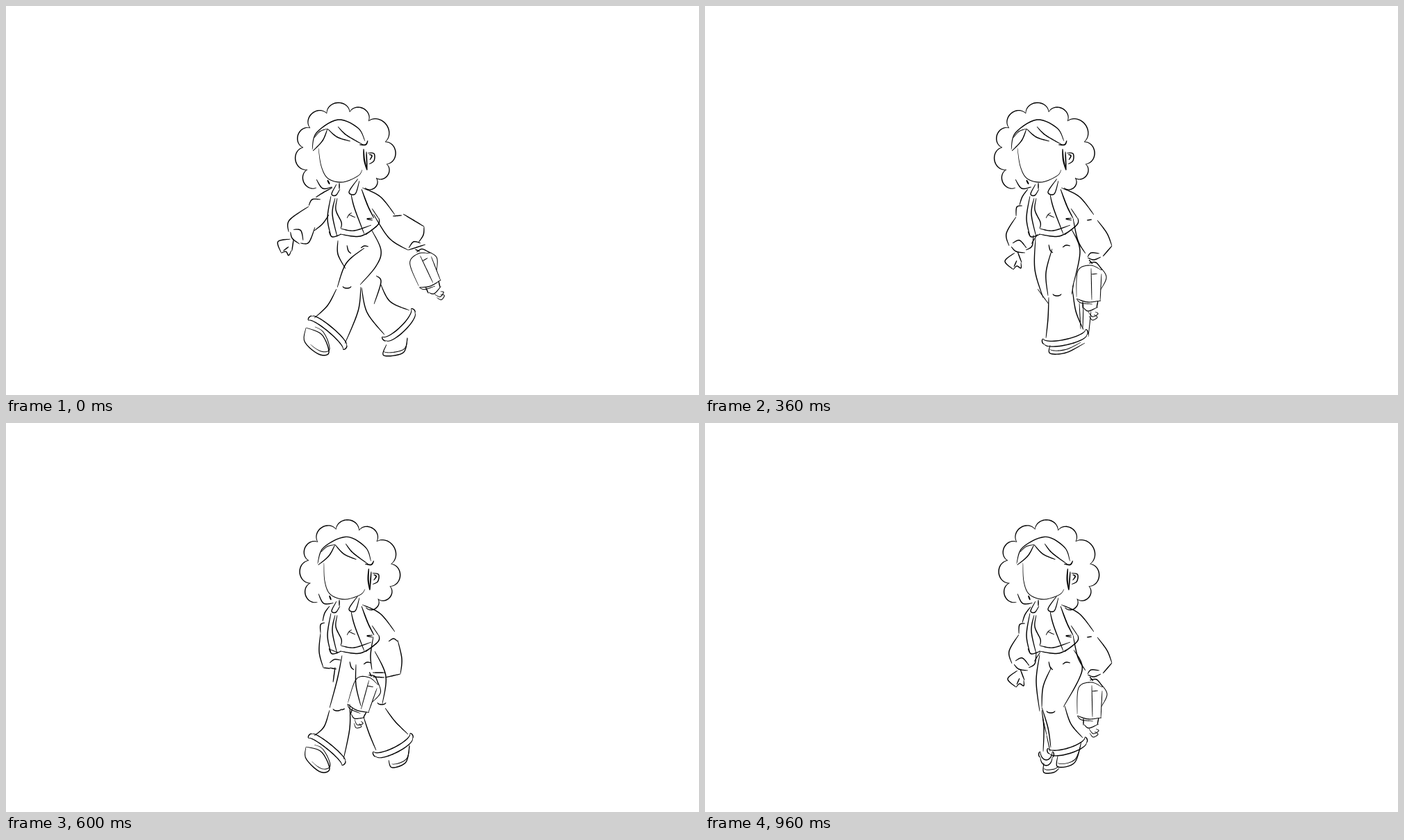
An HTML page with a canvas that plays this animation: 998x561 px, repeating every 1080 ms.

```html
<!DOCTYPE html>
<html lang="en">
<head>
<meta charset="utf-8">
<title>Walk cycle</title>
<style>
html, body { margin: 0; width: 100%; height: 100%; overflow: hidden; background: #fff; }
canvas { display: block; width: 998px; height: 561px; }
</style>
</head>
<body>
<canvas id="stage" width="998" height="561"></canvas>
<script>
const ctx = document.getElementById('stage').getContext('2d');
const STEP = 120, SAMPLES = 28, WEIGHT = 1.4;
const line = (fn, w = WEIGHT) => ({ w, pts: Array.from({ length: SAMPLES + 1 }, (_, i) => fn(i / SAMPLES)) });

// Smooth curve through x y pairs; an odd count means a leading line weight.
function curve(nums) {
  const w = nums.length % 2 ? nums.shift() : WEIGHT;
  const n = nums.length / 2 - 1;
  const at = (i, k) => nums[2 * Math.max(0, Math.min(n, i)) + k];
  return line(s => {
    const i = Math.min(n - 1, Math.floor(s * n)), t = s * n - i;
    return [0, 1].map(k => {
      const a = at(i - 1, k), b = at(i, k), c = at(i + 1, k), d = at(i + 2, k);
      return b + t * ((c - a) + t * ((2 * a - 5 * b + 4 * c - d) + t * (3 * b - a - 3 * c + d))) / 2;
    });
  }, w);
}

// Half-oval between two points, bulging to the left of the way from a to b.
function arc(a, b, bulge, w) {
  const dx = b[0] - a[0], dy = b[1] - a[1];
  return line(t => {
    const u = (1 - Math.cos(Math.PI * t)) / 2, h = bulge * Math.sin(Math.PI * t);
    return [a[0] + dx * u + dy * h, a[1] + dy * u - dx * h];
  }, w);
}

const split = text => text.split('/').map(s => s.trim().split(' ').map(Number));
const ink = text => split(text).map(curve);
const mapPts = (art, f) => art.map(l => ({ w: l.w, pts: l.pts.map(f) }));
const shift = (art, dx, dy) => mapPts(art, ([x, y]) => [x + dx, y + dy]);
const mid = (a, b) => a.map((l, i) => ({
  w: (l.w + b[i].w) / 2,
  pts: l.pts.map((p, j) => p.map((v, k) => (v + b[i].pts[j][k]) / 2))
}));
function turn(art, cx, cy, a) {
  const c = Math.cos(a), s = Math.sin(a);
  return mapPts(art, ([x, y]) => [cx + (x - cx) * c - (y - cy) * s, cy + (x - cx) * s + (y - cy) * c]);
}

// Hair: one curl between each pair of neighbouring joints.
const joints = split('447 262/434 236/428 204/438 176/462 155/495 153/522 166/546 196/548 228/533 248/517 262');
const curls = joints.slice(1).map((p, i) => arc(joints[i], p, 0.44));
const face = ink('441 207 447 183 478 164 507 176 517 195/463 177 456 194 442 209/1 444 190 452 181 463 177/' +
  '463 177 477 189 496 195/478 174 490 186 514 200/1.7 521 194 518 200 509 200/' +
  '1 450 205 454 231 464 249 485 254 507 245 513 236/2 515 206 516 222 520 237/1.6 519 210 520 236/' +
  '521 212 530 213 530 223 523 228/1.6 523 214 527 216 524 222/447 250 456 263 470 261/2 463 251 466 257');
const headA = curls.concat(face), headB = turn(headA, 483, 275, 0.11);

const torso = ink('480 255 480 264/476 257 469 271 475 273 481 264/507 249 494 268 503 271 509 252/' +
  '468 274 463 306 468 332/474 277 470 300 477 333/477 277 475 294 483 312 482 321/' +
  '1 491 306 494 301 498 298/1 494 301 503 305/497 272 502 292 516 329/1.6 512 264 521 288 530 306/' +
  '1 527 292 537 307/528 306 520 307 528 309/482 321 501 324 526 316/481 329 510 332 534 318/' +
  '537 306 536 315 518 330/465 325 470 333 483 329');
const crease = ink('491 345 493 353 497 357/511 349 516 346 522 347');

// Bag with the hand that holds it, measured from its top.
const bag = ink('1 -20 46 -18 8 0 0 16 7/1 16 12 14 52/1 1 4 2 50/1 1 13 10 12/1.2 -20 48 -4 53 15 51/' +
  '1 -20 48 -14 54 3 56/-11 52 -11 62/9 61 11 51/1.2 -10 61 -3 66 11 60/' +
  '1 -3 67 3 74 11 70 7 67/1 -2 73 3 79 10 75 5 71/1 14 2 23 17 15 35/-2 -3 8 -4 17 7/-2 -8 3 -2');
function bagAt(x, y, a, k) {
  return shift(turn(mapPts(bag, p => p.map(v => v * k)), 0, 0, a), x, y);
}

// Sleeves: swung out, hanging, tucked in.
const leftOut = ink('470 262 457 269 446 276/453 279 441 279 436 288/436 289 408 309 407 326/' +
  '465 301 456 314 444 324/424 342 436 341 445 319');
const leftHang = ink('465 264 457 275 453 287/457 288 449 290 448 303/448 304 434 328 438 346/' +
  '1 479 329 470 343/473 330 471 346 462 352');
const leftIn = ink('466 264 459 274 456 286/459 288 453 291 453 303/453 303 451 330 457 353/' +
  '1 465 326 478 331/457 353 467 354');
const fist = ink('443 342 453 338 463 349/441 347 448 354 461 356/446 356 432 368 444 380/' +
  '444 380 449 375 455 378 455 370/445 376 449 367/450 354 456 370');
const fistOut = shift(turn(fist, 451, 352, 0.5), -35, -17);
const cuffIn = ink('466 346 473 341 482 342/466 353 476 355/474 352 471 374');

const shoulder = '513 262 539 275 560 301/';
const rightOut = ink(shoulder + '557 303 570 302/572 300 602 318/602 318 601 330 594 341/' +
  '529 300 552 335 579 352/580 349 587 340 597 342/579 352 604 344');
const rightHang = ink(shoulder + '550 309 557 308/565 309 579 328 586 346/586 346 573 361/' +
  '530 306 537 338 548 357/551 362 556 356 568 357/551 363 560 366 570 362');
const rightIn = ink(shoulder + '551 315 558 311 564 315/564 313 570 340 568 362/568 362 546 367/' +
  '529 308 525 335 527 356/528 360 546 360/528 366 545 367');

// Leg: two thigh lines, two shin lines, a shoe and perhaps a knee tick; the hem follows from the shins.
function leg(text) {
  const rows = split(text), knee = rows[5], art = rows.slice(0, 5).map(curve);
  const a = art[2].pts[SAMPLES], b = art[3].pts[SAMPLES];
  const dx = b[0] - a[0], dy = b[1] - a[1], len = Math.hypot(dx, dy);
  const ux = dx / len, uy = dy / len;
  const from = [a[0] - ux * 4, a[1] - uy * 4], to = [b[0] + ux * 3, b[1] + uy * 3];
  const sag = Math.min(7, 7 - dy / 3) / len;
  const drop = ([x, y], d) => [x - uy * d, y + ux * d];
  art.push(arc(from, to, -sag), arc(drop(from, 8), drop(to, 8), -sag));
  art.push(arc(from, drop(from, 8), -0.3), arc(to, drop(to, 8), 0.3));
  const sole = art[4].pts;
  art.push(line(t => {
    const p = sole[Math.round(SAMPLES * (0.3 + 0.6 * t))];
    return [p[0] + 1, p[1] - 5];
  }, 1));
  if (knee) art.push(arc([knee[0] - 6, knee[1] - 3], [knee[0] + 6, knee[1] - 3], -0.25));
  return art;
}

const near0 = leg('516 349 490 371 477 406/526 322 540 352 533 375 510 402/476 408 463 432 444 450/' +
  '511 405 507 440 488 487/432 464 430 484 450 502 465 500 455 474 432 464/491 407');
const near1 = leg('516 348 490 370 474 408/526 322 538 354 531 376 509 399/474 411 464 438 449 472/' +
  '508 404 504 435 511 474/447 487 443 500 468 503 492 487/490 410');
const near2 = leg('500 350 491 385 494 418/528 322 540 354 529 407/495 420 494 450 491 479/' +
  '529 407 534 440 545 467/497 489 497 501 520 500 547 486/507 418');
const near3 = leg('504 348 504 378 511 408/531 329 547 365 542 405/515 424 523 448 533 472/' +
  '546 411 560 430 579 449/551 486 556 497 576 489 581 464/541 406');
const near4 = leg('505 348 499 378 500 408/531 329 546 372 534 414/508 431 518 450 530 470/' +
  '538 416 555 433 573 441/549 486 564 491 577 470 573 448/538 416');
const near5 = leg('499 352 487 380 485 410/531 327 543 357 516 410/485 410 494 440 498 468/' +
  '518 408 527 434 544 454/508 480 508 496 532 490 542 460/498 418');

const far0 = leg('533 389 540 398 530 430/478 338 478 358 489 379/512 406 520 442 545 474/' +
  '539 400 553 426 581 439/548 488 544 504 572 500 578 478');
const far1 = leg('530 384 532 398 536 411/480 335 475 352 480 376/507 420 522 449 544 475/' +
  '536 410 555 431 581 441/548 486 548 499 571 495 581 470/521 425');
const far2 = ink('476 335 475 380 487 421/1 479 408 495 430/1 539 428 541 466/1 545 430 544 466/' +
  '1 556 440 552 477/1 531 400 528 416');
const far3 = leg('484 335 477 370 466 411/488 412 483 414/466 414 458 438 444 451/' +
  '495 405 495 440 486 485/432 467 432 484 452 503 466 499 454 474 432 467/477 415');
const far4 = leg('484 335 477 380 478 427/488 421 484 426/479 430 478 450 476 475/' +
  '514 440 522 455 526 473/478 489 480 504 500 504 522 489/486 426');
const far5 = leg('482 334 477 372 482 416/1 486 424 492 450/485 414 488 440 487 474/' +
  '1 492 450 497 474/488 490 488 504 502 504 510 498');
const farPass = shift(turn(far1, 505, 340, 0.1), 0, -6);
const farReach = turn(far3, 490, 335, -0.15);

const leftUp = turn(leftOut.concat(fistOut), 463, 270, 0.028);
const leftDown = leftHang.concat(fist);
const rightUp = turn(rightOut, 520, 265, -0.055);
const tucked = [leftIn, cuffIn, rightIn];
const crease2 = shift(crease, 4, -1);

const poses = [
  [headA, crease, leftOut, fistOut, rightOut, near0, far0, bagAt(594, 357, -0.42, 0.94)],
  [headA, crease, leftUp, rightUp, near1, far1, bagAt(600, 352, -0.46, 0.94)],
  [headA, crease, mid(leftUp, leftDown), mid(rightUp, rightHang), mid(near1, near2), farPass, bagAt(577, 364, -0.23, 0.97)],
  [headA, crease2, leftDown, rightHang, near2, far2, bagAt(555, 374, 0, 1)],
  [headA, crease2, mid(leftHang, leftIn), shift(fist, 8, 0), mid(rightHang, rightIn), mid(near2, near3), farReach, bagAt(539, 371, 0.14, 0.97)],
  [headB, crease2, ...tucked, near3, far3, bagAt(523, 367, 0.29, 0.95)],
  [headB, crease2, ...tucked, mid(near3, near4), mid(far3, far4), bagAt(522, 368, 0.23, 0.95)],
  [headB, crease2, ...tucked, near4, far4, bagAt(520, 369, 0.16, 0.95)],
  [headB, crease2, shift(leftDown, 4, 1), rightHang, near5, far5, bagAt(556, 374, 0, 1)]
].map(parts => [torso, ...parts].flat());

// Fill a stroke that thins towards both ends.
function brush({ w, pts }) {
  const left = [], right = [];
  pts.forEach(([x, y], i) => {
    const a = pts[Math.max(0, i - 1)], b = pts[Math.min(SAMPLES, i + 1)];
    const dx = b[0] - a[0], dy = b[1] - a[1], len = Math.hypot(dx, dy) || 1;
    const r = w / 2 * (0.3 + 0.75 * Math.sqrt(Math.abs(Math.sin(Math.PI * i / SAMPLES))));
    left.push([x - dy / len * r, y + dx / len * r]);
    right.unshift([x + dy / len * r, y - dx / len * r]);
  });
  ctx.beginPath();
  left.concat(right).forEach(([x, y]) => ctx.lineTo(x, y));
  ctx.fill();
}

let shown = -1;
function tick() {
  const i = Math.floor(performance.now() / STEP) % poses.length;
  if (i !== shown) {
    shown = i;
    ctx.fillStyle = '#fff';
    ctx.fillRect(0, 0, 998, 561);
    ctx.fillStyle = '#000';
    poses[i].forEach(brush);
  }
  requestAnimationFrame(tick);
}
tick();
</script>
</body>
</html>
```
